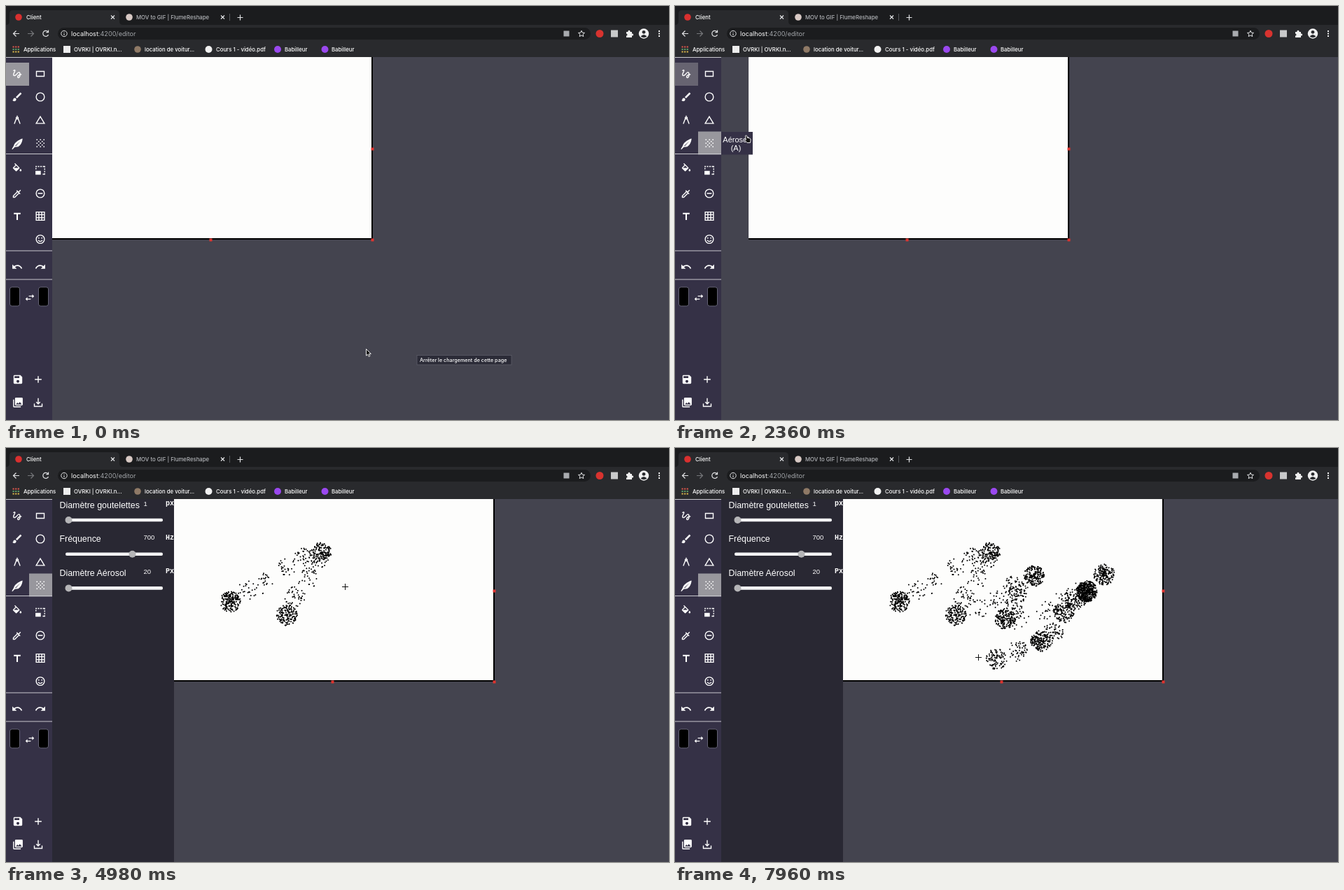
These frames come from a looping animation (947 px wide and 592 px high, 8000 ms). An HTML page with a canvas:

```html
<!DOCTYPE html>
<html lang="fr">
<head>
<meta charset="utf-8">
<title>Éditeur</title>
<style>
html, body { margin: 0; width: 100%; height: 100%; overflow: hidden; background: #44444f; }
svg, canvas { position: absolute; left: 0; top: 0; width: 947px; height: 592px; }
text { fill: #fff; white-space: pre; }
.ui text { font: 500 7.8px Inter, sans-serif; }
.ui .url { font: 400 9.1px Inter, sans-serif; }
.ui .dim { fill: #b4b6ba; }
.panel text { font: 12.4px "Liberation Sans", Arial, sans-serif; }
.panel .value { font-size: 9.5px; }
.panel .unit { font: bold 10px "Liberation Mono", monospace; }
.tip text { font: 11px "Liberation Sans", Arial, sans-serif; text-anchor: middle; }
.line { fill: none; stroke: #fff; stroke-width: 2; }
.solid { fill: #fff; fill-rule: evenodd; }

.slide, .panel, .tip, .hint, #hover, #pencil { animation: 8s linear infinite; }
.slide { animation-name: open; }
.panel { animation-name: reveal; }
.hint { animation-name: hint; }
#select { animation-name: select; }
#spray { animation-name: spray; }
#hover { animation-name: hover; }
#pencil { animation-name: pencil; }
@keyframes open {
  0%, 27.825% { transform: none; animation-timing-function: cubic-bezier(.25, .8, .25, 1); }
  52.2%, 100% { transform: translateX(174px); }
}
@keyframes reveal {
  0%, 30.6% { opacity: 0; }
  30.7%, 100% { opacity: 1; }
}
@keyframes hint {
  0%, 10% { opacity: 1; }
  14.5%, 100% { opacity: 0; }
}
@keyframes select {
  0%, 10.2% { transform: translateX(-56px); }
  12% { transform: translateX(-30px); }
  13.25% { transform: translateX(-38px); }
  15%, 100% { transform: translateX(-56px); }
}
@keyframes spray {
  0%, 12% { transform: translateX(-46px); }
  13.25% { transform: translateX(-15px); }
  14.5%, 30% { transform: none; }
  32.5%, 100% { transform: translateX(-46px); }
}
@keyframes hover {
  0%, 12% { opacity: 0; }
  13.25%, 27.5% { opacity: .5; }
  29%, 100% { opacity: 1; }
}
@keyframes pencil {
  0%, 27.5% { opacity: 1; }
  31.5%, 100% { opacity: 0; }
}
</style>
</head>
<body>
<svg viewBox="0 0 947 592">
  <rect width="947" height="592" fill="#44444f"/>

  <g class="slide">
    <g class="panel" id="panel"><rect x="-108" y="73" width="174" height="519" fill="#292833"/></g>
    <path d="M66 73h458v261H66z"/>
    <path d="M66 73h456v259H66z" fill="#fdfdfc"/>
    <path d="M521.5 202.5h4v4h-4zm0 130h4v4h-4zm-231 0h4v4h-4z" fill="#e0342f"/>
  </g>

  <g class="tip" id="select">
    <rect x="66" y="219" width="56" height="33" fill="#353146"/>
    <text x="92" y="235">Sélection</text><text x="92" y="247">(R)</text>
  </g>
  <g class="tip" id="spray">
    <rect x="66" y="180" width="45" height="32.5" fill="#353146"/>
    <text x="87" y="195">Aérosol</text><text x="87" y="207">(A)</text>
  </g>

  <g id="tools">
    <rect y="73" width="66" height="519" fill="#353146"/>
    <rect id="pencil" y="81" width="33" height="33" fill="#98979d"/>
    <rect id="hover" x="33" y="179.500" width="33" height="33" fill="#98979d"/>
    <path d="M0 73.500h66M0 211.500h66M0 350h66M0 391h66" stroke="#c9c8ce" stroke-width="1.200"/>
    <g stroke="#77758a" stroke-width=".8">
      <rect x="5.500" y="402" width="14" height="27" rx="3"/>
      <rect x="46.500" y="402" width="14" height="27" rx="3"/>
    </g>
  </g>

  <g class="ui">
    <rect width="947" height="73" fill="#292a2d"/>
    <rect width="947" height="27" fill="#1b1c1e"/>
    <path d="M0 27q5 0 5-5v-11q0-5 5-5h146q6 0 6 5v11q0 5 5 5z" fill="#292a2d"/>
    <rect x="74" y="31" width="761" height="17" rx="8.500" fill="#1b1c1e"/>
    <circle cx="18" cy="16" r="4.800" fill="#d9302f"/>
    <text x="29" y="19">Client</text>
    <circle cx="176" cy="16" r="4.800" fill="#d8c9c4"/>
    <text class="dim" x="186" y="19">MOV to GIF | FlumeReshape</text>
    <path d="M319.500 11v10" stroke="#55575a"/>
    <g fill="none" stroke="#e2e3e5" stroke-width="1.200">
      <path d="M150 13.500l5 5m0-5l-5 5M307 13.500l5 5m0-5l-5 5M330.500 16.500h8m-4-4v8"/>
      <path d="M19 39.500h-8.500m4-4l-4 4 4 4"/>
      <path d="M31 39.500h8.500m-4-4l4 4-4 4" stroke="#75777a"/>
      <path d="M60 37a4 4 0 1 0 .5 4M60.500 34.500v3.200h-3.200"/>
      <circle cx="83" cy="39.500" r="4.200" stroke-width="1"/>
      <path d="M83 39v3m0-5v1" stroke-width="1"/>
      <path d="M822 35.200l1.300 2.900 3.200.3-2.400 2.100.7 3.100-2.800-1.600-2.800 1.600.7-3.100-2.400-2.100 3.200-.3z" stroke-width="1"/>
    </g>
    <text class="url" x="93" y="43">localhost<tspan fill="#a2a5a9">:4200/editor</tspan></text>
    <rect x="796.500" y="35.500" width="8" height="8" fill="#a9abaf"/>
    <circle cx="848" cy="39.500" r="5.500" fill="#d8332f"/>
    <rect x="864" y="34.500" width="10" height="10" fill="#c9cacb"/>
    <path d="M886 37h2.500a1.600 1.600 0 1 1 3 0h2.500v2.500a1.600 1.600 0 1 1 0 3V45h-8v-2.500a1.500 1.500 0 1 0 0-3z" fill="#f1f1f1"/>
    <circle cx="911" cy="39.500" r="7.200" fill="#f1f1f1"/>
    <circle cx="911" cy="37.300" r="2.400" fill="#292a2d"/>
    <path d="M906.500 43.500q4.500-5 9 0-4.500 3.500-9 0" fill="#292a2d"/>
    <path d="M932 35h2v2h-2zm0 3.500h2v2h-2zm0 3.500h2v2h-2z" fill="#f1f1f1"/>
    <g fill="none" stroke-width="2.200" stroke-dasharray="2.200 1.400">
      <path d="M9.500 58.500h10" stroke="#d9574c"/>
      <path d="M9.500 62h10" stroke="#5b9b68"/>
      <path d="M9.500 65.500h10" stroke="#d8b34a"/>
    </g>
    <text x="25" y="64.500">Applications</text>
    <rect x="82" y="57" width="10" height="10" fill="#eee"/>
    <text x="97" y="64.500">OVRKI | OVRKI.n...</text>
    <circle cx="188" cy="62" r="4.800" fill="#8f7a66"/>
    <text x="198" y="64.500">location de voitur...</text>
    <circle cx="289.500" cy="62" r="5" fill="#f1f1f1"/>
    <text x="300" y="64.500">Cours 1 - vidéo.pdf</text>
    <circle cx="388" cy="62" r="5" fill="#9a48ef"/>
    <text x="398" y="64.500">Babilleur</text>
    <circle cx="455.500" cy="62" r="5" fill="#9a48ef"/>
    <text x="465" y="64.500">Babilleur</text>
  </g>

  <g class="ui hint">
    <rect x="587" y="499.500" width="135" height="13.500" fill="#2b2b37" stroke="#5d5d68" stroke-width=".8"/>
    <text x="591" y="508.800" style="font-size:7.2px">Arrêter le chargement de cette page</text>
  </g>
</svg>
<canvas width="947" height="592"></canvas>

<script>
const LOOP = 8000;
const svgNode = (parent, markup) => parent.insertAdjacentHTML('beforeend', markup);

// Tool icons: centre, style, path on a 24-unit grid
const tools = document.getElementById('tools');
const icon = (x, y, style, d) => svgNode(tools,
  `<path class="${style}" transform="translate(${x} ${y}) scale(.69) translate(-12 -12)" d="${d}"/>`);
const ring = r => `M${12 - r} 12a${r} ${r} 0 1 0 ${2 * r} 0a${r} ${r} 0 1 0 ${-2 * r} 0`;
const undo = 'M12.5 8c-2.7 0-5 1-6.900 2.600L2 7v9h9l-3.600-3.600c1.400-1.200 3.200-1.900 5.100-1.900 3.500 0 6.500 2.300 7.600 5.500l2.400-.8C21 11 17 8 12.500 8z';

let dots = '';
for (let row = 0; row < 5; row++)
  for (let col = row % 2; col < 5; col += 2)
    dots += `M${4 + col * 3.6} ${4 + row * 3.6}h2.300v2.300h-2.300z`;

icon(16, 97, 'line', 'M4 6C7 3 9 4 6 9S4 17 8 15 13 8 16 9s2 10-1 11-4-6 6-7');
icon(49, 97, 'line', 'M4 7h16v10H4z');
icon(16, 130, 'solid', 'M7 14c-1.700 0-3 1.300-3 3 0 1.300-1.200 2-2 2 1 1.200 2.500 2 4 2 2.200 0 4-1.800 4-4 0-1.700-1.300-3-3-3zm13.700-9.400l-1.300-1.300q-.7-.6-1.400 0L9 12.300 11.800 15l9-9q.6-.7-.1-1.400z');
icon(49, 130, 'line', ring(8.500));
icon(16, 163, 'line', 'M12 3v4M11 7L6 20M13 7l5 13M10 7h4v3h-4z');
icon(49, 163, 'line', 'M12 5L20.500 19h-17z');
icon(16, 197, 'solid', 'M1 23L5 16C6 10 14 4 23 1c0 7-4 14-9 17l-7 1-5 5zM8 16L19 6 9 17z');
icon(49, 196, 'solid', dots);
icon(16, 233, 'solid', 'M16.600 9L7.600 0 6.200 1.400l2.400 2.400L3.400 9q-1 1 0 2l5.500 5.500q1 1 2.100 0l5.600-5.500q.9-1 0-2zM5.200 10L10 5.200 14.800 10zM19 11.500s-2 2.200-2 3.500a2 2 0 0 0 4 0c0-1.300-2-3.500-2-3.500z');
icon(49, 235, 'solid', 'M2 3h3v2H2zm5 0h3v2H7zm5 0h3v2h-3zm5 0h5v3h-2V5h-3zM2 7h2v3H2zm18 1h2v3h-2zm0 5h2v3h-2zm0 5h2v3h-5v-2h3zM2 13h11v8H2z');
icon(16, 268, 'line', 'M4 20v-3l9-9 3 3-9 9zM11 6l7 7M15 9l4-4');
icon(49, 268, 'line', ring(8.500) + 'M7 12h10');
icon(16, 300.5, 'solid', 'M5 5h14v3h-5.500v12h-3V8H5z');
icon(49, 300.5, 'line', 'M3.500 3.500h17v17h-17zM9 3v18M15 3v18M3 9h18M3 15h18');
icon(49, 333.5, 'line', ring(8.500) + 'M7.500 14q4.500 5 9 0M7.500 9.500h2.400M14 9.500h2.400');
icon(16, 373, 'solid', undo);
svgNode(tools, `<path class="solid" transform="translate(49 373) scale(-.69 .69) translate(-12 -12)" d="${undo}"/>`);
icon(34, 417, 'solid', 'M7 11l-4 4 4 4v-3h7v-2H7zM21 9l-4-4v3h-7v2h7v3z');
icon(17, 534, 'solid', 'M17 3H5q-2 0-2 2v14q0 2 2 2h14q2 0 2-2V7zM12 19a3 3 0 1 1 0-6 3 3 0 0 1 0 6zM15 9H5V5h10z');
icon(46, 534, 'line', 'M12 5v14M5 12h14');
icon(17, 567, 'solid', 'M22 16V4q0-2-2-2H8q-2 0-2 2v12q0 2 2 2h12q2 0 2-2zm-11-4l2 2.700L16 11l4 5H8zM2 6v14q0 2 2 2h14v-2H4V6z');
icon(46, 567, 'line', 'M4 14v6h16v-6M12 3v12M8 11l4 4 4-4');

// Settings panel, placed 174px left of its open position
const panel = document.getElementById('panel');
[['Diamètre goutelettes', 1, 'px', 89.5], ['Fréquence', 700, 'Hz', 180.5], ['Diamètre Aérosol', 20, 'Px', 89.5]]
  .forEach(([label, value, unit, thumb], i) => svgNode(panel, `<g transform="translate(-174 ${i * 48.7})">
    <text x="76.500" y="85.500">${label}</text>
    <text class="value" x="196.500" y="82.500">${value}</text>
    <text class="unit" x="228" y="82">${unit}</text>
    <rect x="85" y="100.700" width="139" height="4.600" rx="2" fill="#f4f4f5"/>
    <circle cx="${thumb}" cy="103" r="5" fill="#b5b5b7"/></g>`));

// Pointer stops: time, x, y; spraying stops add a droplet count
const approach = [
  [0, 514, 490], [250, 505, 480], [800, 70, 255], [930, 50, 228], [1060, 37, 188], [1250, 44, 194],
  [2230, 50, 194], [2360, 101, 186], [2700, 250, 205], [3200, 319, 221]
];
const strokes = [
  [3480, 320, 220, 190], [3950, 345, 205, 22], [4000, 367, 194, 24], [4060, 402, 171, 26], [4110, 426, 158, 36],
  [4150, 450, 150, 160], [4500, 442, 165, 26], [4550, 431, 187, 26], [4620, 413, 212, 40],
  [4660, 401, 239, 170], [4900, 432, 230, 20], [4940, 456, 216, 24], [4980, 484, 198, 44],
  [5060, 513, 183, 190], [5380, 491, 207, 64], [5430, 483, 225, 36],
  [5470, 472, 244, 190], [5740, 492, 246, 20], [5790, 530, 233, 22], [5830, 556, 218, 24], [5870, 575, 204, 24],
  [6000, 613, 181, 180], [6340, 588, 205, 440], [6800, 572, 217, 80], [6870, 555, 235, 150],
  [7040, 540, 264, 60], [7090, 523, 276, 200], [7600, 490, 290, 54], [7680, 459, 302, 110], [7960, 433, 299, 0]
];
const stops = [...approach, ...strokes];
const TRAVEL = 60, LAG = 95, RADIUS = 15;

const leaveTime = i => stops[i][3] ? Math.max(stops[i][0], stops[i + 1][0] - TRAVEL) : stops[i][0];

function pointerAt(t) {
  let i = stops.length - 1;
  while (stops[i][0] > t) i--;
  const [, x, y] = stops[i];
  if (i === stops.length - 1) return [x, y];
  const [next, nx, ny] = stops[i + 1], leave = leaveTime(i);
  const k = Math.max(0, (t - leave) / (next - leave));
  return [x + (nx - x) * k, y + (ny - y) * k];
}

let seed = 7;
const random = () => (seed = seed * 16807 % 2147483647) / 2147483647;

const droplets = [];
stops.forEach(([t, x, y, count = 0], i) => {
  for (let n = 0; n < count; n++) {
    const angle = random() * 2 * Math.PI, r = RADIUS * random() ** .6;
    const born = t + LAG + (leaveTime(i) - t) * n / count;
    droplets.push([born, x + r * Math.cos(angle), y + r * Math.sin(angle)]);
  }
});

const ctx = document.querySelector('canvas').getContext('2d');
const arrow = new Path2D('M0 0v9.500l2.200-2 1.500 3.300 1.700-.8-1.500-3.100h3z');
const hand = new Path2D('M-1-1q1.300-1 2 0l1 3 3 .5q2 .5 1.500 3L6 9H1.500L-2 5.500q0-1.500 1.800-.5z');
const cross = new Path2D('M-4.500 0h9M0-4.500v9');

function drawPointer(t) {
  const [x, y] = pointerAt(t);
  ctx.save();
  ctx.translate(Math.round(x) + .5, Math.round(y) + .5);
  if (t > 2440) {
    ctx.strokeStyle = '#111';
    ctx.lineWidth = 1;
    ctx.stroke(cross);
  } else {
    const shape = x < 66 || t > 1000 ? hand : arrow;
    ctx.fillStyle = '#111';
    ctx.strokeStyle = '#fff';
    ctx.lineWidth = .9;
    ctx.fill(shape);
    ctx.stroke(shape);
  }
  ctx.restore();
}

const start = performance.now();
function render() {
  const t = Math.max(0, performance.now() - start) % LOOP;
  ctx.clearRect(0, 0, 947, 592);
  ctx.fillStyle = '#000';
  ctx.beginPath();
  for (const [born, x, y] of droplets)
    if (born <= t) {
      ctx.moveTo(x + 1, y);
      ctx.arc(x, y, 1, 0, 7);
    }
  ctx.fill();
  drawPointer(t);
  requestAnimationFrame(render);
}
render();
</script>
</body>
</html>
```
